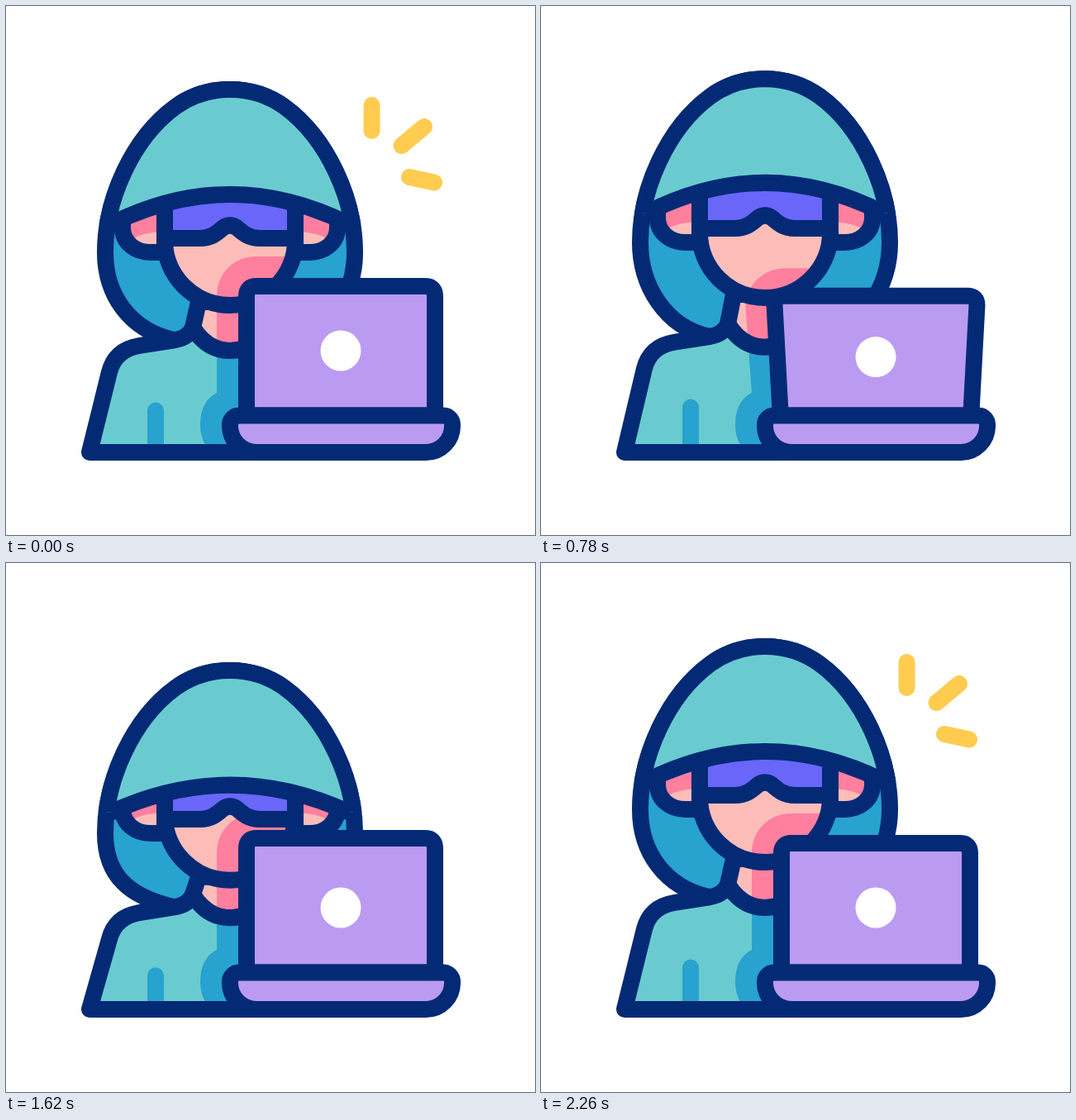
An HTML page for the animation above (2.6 s loop, 640x640 px).

```html
<!DOCTYPE html>
<html lang="en">
<head>
<meta charset="utf-8">
<title>Hooded figure at a laptop</title>
<style>
  html, body { margin: 0; width: 100%; height: 100%; overflow: hidden; background: #fff; }
  svg { display: block; width: 100%; height: 100%; }
  .line { fill: none; stroke: #042a75; stroke-width: 20; stroke-linejoin: round; }
  .teal { fill: #69cbd0; }
  .blue { fill: #28a2ce; }
  .skin { fill: #fcbdb8; }
  .pink { fill: #ff7f9f; }
  .lilac { fill: #bb9af2; }
  .bar { fill: none; stroke-width: 20; stroke-linecap: round; }
</style>
</head>
<body>
<svg viewBox="0 0 640 640">
  <defs>
    <path id="hood"/>
    <path id="neck"/>
    <path id="body"/>
    <path id="face"/>
    <path id="lid"/>
    <path id="shade"/>
    <path id="base" d="M282 495.5H529A11 11 0 0 1 540 507A32 32 0 0 1 508 540H303A32 32 0 0 1 271 507A11 11 0 0 1 282 495.5Z"/>
    <path id="earShape" d="M141 225V268C141 286 156 298 175 298H192V225Z"/>
    <g id="ear">
      <use href="#earShape" class="pink"/>
      <path class="skin" d="M152 283Q162 274 192 273V298H175C165 298 155 292 152 283Z"/>
      <use href="#earShape" class="line"/>
    </g>
    <clipPath id="inNeck"><use href="#neck"/></clipPath>
    <clipPath id="inBody"><use href="#body"/></clipPath>
    <clipPath id="inFace"><use href="#face"/></clipPath>
    <clipPath id="aboveBrim"><path id="brimArea"/></clipPath>
  </defs>

  <path id="rays" class="bar" stroke="#ffcc50"/>

  <use href="#hood" class="blue"/>
  <use href="#hood" class="line"/>

  <use href="#neck" class="skin"/>
  <g clip-path="url(#inNeck)"><use href="#shade" class="pink"/></g>
  <use href="#neck" class="line"/>

  <use href="#body" class="teal"/>
  <g clip-path="url(#inBody)">
    <use href="#shade" class="blue"/>
    <path id="arm" class="bar" stroke="#28a2ce"/>
  </g>
  <use href="#body" class="line"/>

  <g id="ears">
    <use href="#ear"/>
    <use href="#ear" transform="translate(542) scale(-1 1)"/>
  </g>
  <use href="#face" class="skin"/>
  <g clip-path="url(#inFace)"><use href="#shade" class="pink"/></g>
  <g id="glasses">
    <path fill="#6a66f9" d="M192 281H235C248 281 255 275 263 268Q271 263 279 268C287 275 294 281 307 281H350V200H192Z"/>
    <path class="line" d="M192 281H235C248 281 255 275 263 268Q271 263 279 268C287 275 294 281 307 281H350"/>
  </g>
  <use href="#face" class="line"/>

  <g clip-path="url(#aboveBrim)">
    <use href="#hood" class="teal"/>
    <use href="#hood" class="line"/>
  </g>
  <path id="brim" class="line"/>

  <use href="#lid" class="lilac"/>
  <use href="#lid" class="line"/>
  <circle id="dot" cx="405" r="24.5" fill="#fff"/>
  <use href="#base" class="lilac"/>
  <use href="#base" class="line"/>
</svg>
<script>
const LOOP = 2600;
const $ = id => document.getElementById(id);
const setPath = (id, d) => $(id).setAttribute('d', d);

// Progress from 0 to 1 between two times
const linear = (t, from, to) => Math.max(0, Math.min(1, (t - from) / (to - from)));
const ease = (t, from, to) => {
  const u = linear(t, from, to);
  return u * u * (3 - 2 * u);
};
const easeOut = (t, from, to) => 1 - (1 - linear(t, from, to)) ** 2;

function drawRays(t) {
  const entering = t > 1800;
  const scale = entering
    ? .6 + .83 * easeOut(t, 1800, 1960) - .43 * ease(t, 1960, 2260)
    : 1 + .63 * ease(t, 220, 460);
  const inner = entering ? 0 : linear(t, 260, 460);
  const outer = entering ? linear(t, 1820, 1910) : 1;
  const ray = (x1, y1, x2, y2) => {
    const point = u => {
      const x = x1 + (x2 - x1) * u, y = y1 + (y2 - y1) * u;
      return `${442.5 + (x - 442.5) * scale} ${211 + (y - 211) * scale}`;
    };
    return `M${point(inner)}L${point(outer)}`;
  };
  setPath('rays', inner < outer
    ? ray(442.5, 151, 442.5, 120) + ray(478.5, 169, 506, 146) + ray(488, 207, 518, 213.5)
    : '');
}

function drawHood(top, brim, face, seam) {
  const crown = 101 + top, knot = 122 + top, side = 298 + face;
  setPath('hood', `M203 ${seam}C150 ${seam - 12} 120 ${side + 52} 120 ${side}
    C120 ${234 + face} 153 ${160 + top} 205 ${knot}C227 ${106 + top} 248 ${crown} 271 ${crown}
    S315 ${106 + top} 337 ${knot}C389 ${160 + top} 422 ${234 + face} 422 ${side}
    C422 ${side + 52} 392 ${seam - 12} 339 ${seam}Z`);

  const end = 264 + brim * .93, control = 2 * (228 + brim) - end;
  const arc = `M127 ${end}Q271 ${control} 415 ${end}`;
  setPath('brim', arc);
  setPath('brimArea', `${arc}H640V0H0V${end}Z`);
}

function drawBody(body, chin, seam) {
  const collar = 389 + body, dip = 417 + body;
  const collarCurve = `C237 ${407 + body} 252 ${dip} 271 ${dip}S305 ${407 + body} 316 ${collar}`;
  setPath('neck', `M233 ${358 + chin}L226 ${collar}${collarCurve}L309 ${358 + chin}Z`);
  setPath('body', `M101 540L125 ${443 + body}Q132 ${416 + body} 161 ${411 + body}L205 ${seam}
    Q221 ${401 + body} 226 ${collar}${collarCurve}L340 ${seam}L420 420L440 540Z`);
  setPath('arm', `M181 ${489.5 + chin * .45}V545`);
}

function drawHead(brim, face, chin) {
  const jaw = 283 + chin, brow = 225 + brim;
  setPath('face', `M192 ${brow}V${jaw}A79 79 0 0 0 350 ${jaw}V${brow}Z`);
  for (const id of ['ears', 'glasses']) $(id).setAttribute('transform', `translate(0 ${face})`);
}

function drawLaptop(tilt, drop) {
  const y = 333 + 21 * tilt + drop;
  const left = 291 - 10 * tilt, right = 810 - left;
  const foot = 291 - 1.5 * tilt;
  setPath('lid', `M${foot} 495.5L${left} ${y + 12}Q${left - .5 * tilt} ${y} ${left + 12} ${y}
    H${right - 12}Q${right + .5 * tilt} ${y} ${right} ${y + 12}L${810 - foot} 495.5Z`);
  $('dot').setAttribute('cy', 417 + 9 * tilt);

  // The shadow follows the laptop's outline at a fixed distance
  const edge = 255 - 9 * tilt, roof = 303 + 17 * tilt;
  setPath('shade', `M241 531Q235 520 235 507Q235 478 255 468L${edge} ${roof + 47}
    A47 47 0 0 1 ${edge + 47} ${roof}H420V531Z`);
}

function render(t) {
  const open = ease(t, 220, 480), close = ease(t, 1930, 2260);

  // Rise, sink, crouch, jump, settle
  const face = -26 * open + 37 * ease(t, 480, 1200) + 18 * ease(t, 1300, 1600)
    - 57 * ease(t, 1620, 1870) + 28 * easeOut(t, 1870, 2260);
  const bow = Math.sin(Math.PI * linear(t, 600, 1620));
  const tilt = open - ease(t, 560, 1440) + ease(t, 1660, 1860) - close;

  const top = face - 1.5 * bow;
  const brim = 1.4 * face + 5 * bow;
  const chin = .75 * face;
  const body = .42 * face + 1.5 * bow;
  const seam = 404 + body;

  drawRays(t);
  drawHood(top, brim, face, seam);
  drawBody(body, chin, seam);
  drawHead(brim, face, chin);
  drawLaptop(tilt, 6 * (1 - open + close));
}

const start = performance.now();
function tick() {
  render((performance.now() - start) % LOOP);
  requestAnimationFrame(tick);
}
tick();
</script>
</body>
</html>
```
